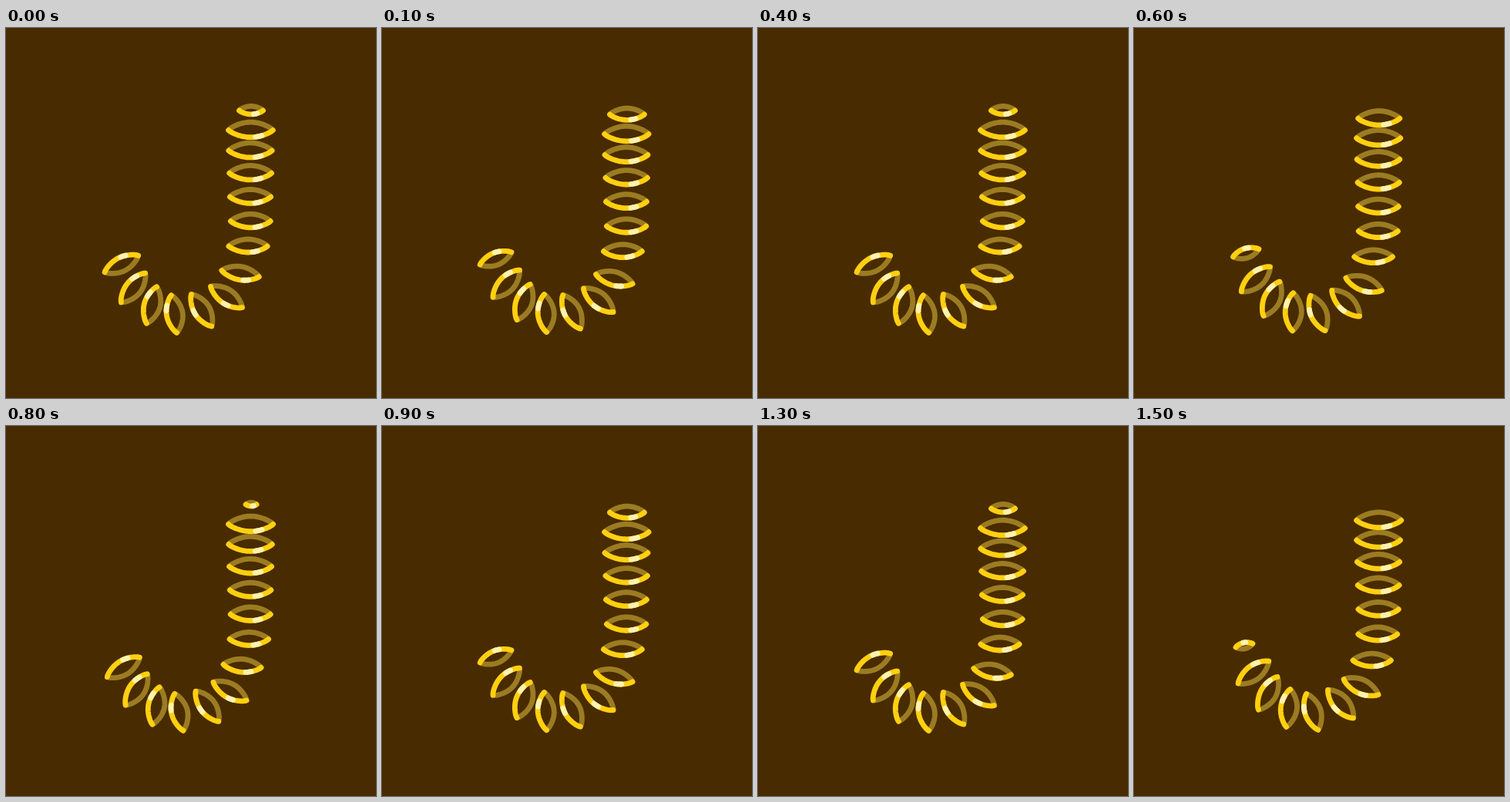
Animation of 480x480 px, one loop 1.6 s. Source, as an HTML page with a canvas:

```html
<!DOCTYPE html>
<html>
<head>
<meta charset="utf-8">
<style>
  html, body { margin: 0; height: 100%; overflow: hidden; background: #492b00; }
  canvas { display: block; }
</style>
</head>
<body>
<canvas id="stage" width="480" height="480"></canvas>
<script>
const ctx = document.getElementById('stage').getContext('2d');
const RINGS = 14;

// The J as a smooth curve, one key point for every second ring
const path = [
  [318, 107], [317, 159], [317, 219], [314, 283],
  [286, 349], [218, 371], [165, 337], [138, 271]
];

const clamp = (v, lo, hi) => Math.min(hi, Math.max(lo, v));

// Catmull-Rom position, u counted in rings from the top
function pathPoint(u) {
  const i = clamp(Math.floor(u / 2), 0, path.length - 2), t = u / 2 - i;
  const a = path[i], b = path[i + 1];
  return [0, 1].map(k => {
    const before = i ? path[i - 1][k] : 2 * a[k] - b[k];
    const after = path[i + 2] ? path[i + 2][k] : 2 * b[k] - a[k];
    const m0 = (b[k] - before) / 2, m1 = (after - a[k]) / 2;
    return a[k] + t * (m0 + t * (3 * (b[k] - a[k]) - 2 * m0 - m1
      + t * (2 * (a[k] - b[k]) + m0 + m1)));
  });
}

// Rings grow at the top, turn through the hook and shrink at its end
function ringAt(u) {
  const ease = v => Math.sin(Math.PI / 2 * clamp(v, 0, 1));
  const [x, y] = pathPoint(u);
  const angle = Math.max(0, u - 6.6) * 24 * Math.PI / 180;
  const length = Math.max(49, 59 - 1.5 * u) * ease(u + 0.35) * ease(RINGS - 0.1 - u);
  return { x, y, angle, length, tilt: Math.sin(angle) };
}

function arc({ x, y, angle, length }, bulge, from, to, color) {
  const n = 40, c = Math.cos(angle), s = Math.sin(angle);
  ctx.beginPath();
  for (let i = 0; i <= n; i++) {
    const t = from + (to - from) * i / n;
    const along = length * (t - 0.5);
    const off = length * bulge * Math.max(0, Math.sin(Math.PI * t)) ** 0.75;
    ctx.lineTo(x + along * c - off * s, y + along * s + off * c);
  }
  ctx.strokeStyle = color;
  ctx.stroke();
}

function draw(phase) {
  ctx.fillStyle = '#492b00';
  ctx.fillRect(0, 0, 480, 480);
  ctx.lineCap = ctx.lineJoin = 'round';
  ctx.lineWidth = 6.8;
  const rings = [];
  for (let i = -1; i < RINGS; i++) rings.push(ringAt(i + phase));
  const visible = rings.filter(ring => ring.length > 8);
  for (const ring of visible)
    arc(ring, -0.18 - 0.05 * ring.tilt, 0, 1, '#9b7c22');
  for (const ring of visible) {
    const bulge = 0.16 + 0.04 * ring.tilt;
    const shine = 0.46 + 0.22 * Math.cos(ring.angle * 1.6);
    arc(ring, bulge, 0, 1, '#ffd010');
    arc(ring, bulge, shine - 0.07, shine + 0.07, '#fff2ac');
  }
}

// A five-step cycle at 12 steps per second, seen ten times per second
function tick() {
  const beat = Math.floor(performance.now() % 1600 / 100);
  draw(Math.floor(beat * 1.2 + 0.3) % 5 / 5);
  requestAnimationFrame(tick);
}
tick();
</script>
</body>
</html>
```
